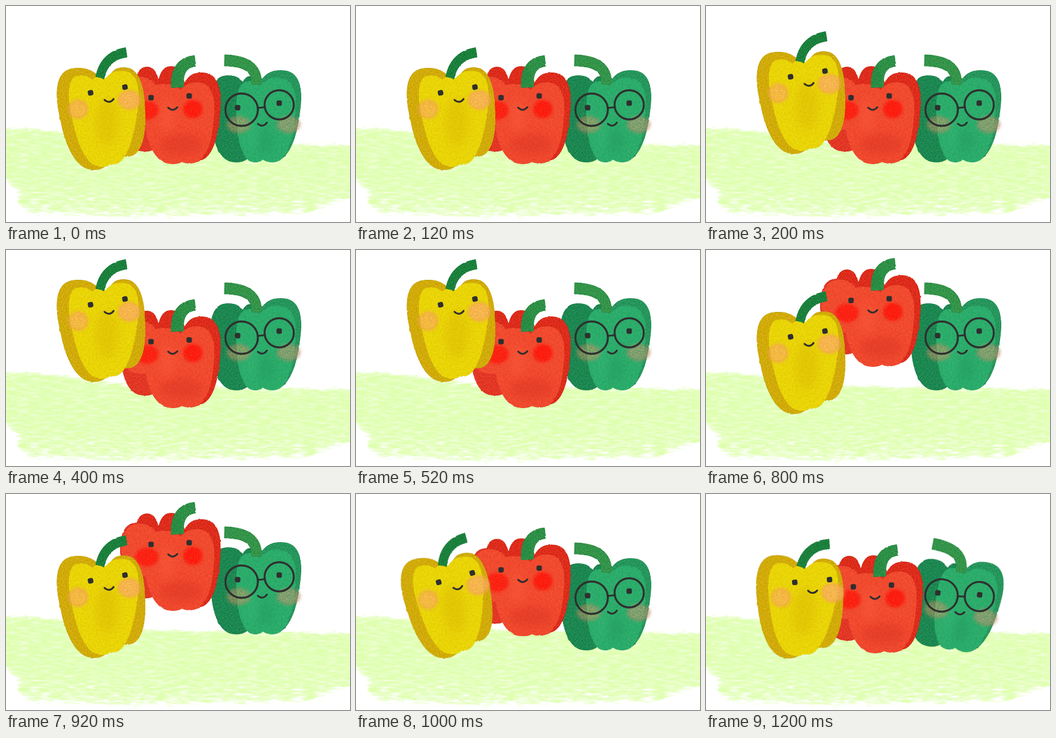
Recreate the animation shown at these times as an HTML page. Size 600 px wide and 377 px high, loop 1400 ms.

```html
<!DOCTYPE html>
<html lang="en">
<head>
<meta charset="utf-8">
<title>Three jumping peppers</title>
<style>
  html, body { margin: 0; width: 100%; height: 100%; overflow: hidden; background: #fff; }
  svg { display: block; width: 100%; height: 100%; }
</style>
</head>
<body>
<svg id="stage" viewBox="0 0 600 377" xmlns="http://www.w3.org/2000/svg"></svg>
<script>
const STEP = 200, STEPS = 7;
const INK = '#2f2f2f';

const outline = points => 'M' + points.map(p => p.map(v => v.toFixed(1))).join('L') + 'Z';
const painted = (d, fill, grain) => `<path d="${d}" fill="${fill}" filter="url(#${grain})"/>`;

// One rounded pepper lobe: a squarish ellipse, narrower and shifted by `lean` towards the bottom
function lobe(x, y, rx, ry, taper = 0, lean = 0) {
  const bulge = v => Math.sign(v) * Math.abs(v) ** 0.8;
  return outline(Array.from({ length: 72 }, (_, i) => {
    const a = i * Math.PI / 36, s = bulge(Math.sin(a));
    return [x + lean * s + rx * (1 - taper * s) * bulge(Math.cos(a)), y + ry * s];
  }));
}

const lobes = (fill, grain, ...list) => painted(list.map(l => lobe(...l)).join(''), fill, grain);

// A stem follows a quadratic curve from base to tip while its width changes evenly
function stem(fill, base, bend, tip, w0, w1) {
  const left = [], right = [];
  for (let t = 0; t <= 1.001; t += 0.05) {
    const [x, y] = [0, 1].map(k => (1 - t) ** 2 * base[k] + 2 * t * (1 - t) * bend[k] + t * t * tip[k]);
    const [vx, vy] = [0, 1].map(k => (1 - t) * (bend[k] - base[k]) + t * (tip[k] - bend[k]));
    const half = (w0 + (w1 - w0) * t) / 2 / Math.hypot(vx, vy);
    left.push([x - vy * half, y + vx * half]);
    right.unshift([x + vy * half, y - vx * half]);
  }
  return `<path d="${outline([...left, ...right])}" fill="${fill}" stroke="${fill}" stroke-width="3"
    stroke-linejoin="round" filter="url(#rough)"/>`;
}

const spot = (filter, x, y, rx, ry, fill, opacity) =>
  `<ellipse cx="${x}" cy="${y}" rx="${rx}" ry="${ry}" fill="${fill}" opacity="${opacity}" filter="url(#${filter})"/>`;
const shade = (...args) => spot('soft', ...args);
const cheek = (...args) => spot('spray', ...args);

const eye = (x, y, turn = 0) =>
  `<rect x="${x - 4.7}" y="${y - 4.7}" width="9.4" height="9.4" rx="3" fill="${INK}" transform="rotate(${turn} ${x} ${y})"/>`;

const line = d => `<path d="${d}" fill="none" stroke="${INK}" stroke-width="3.2" stroke-linecap="round"/>`;

const smile = (x, y, turn) =>
  `<g transform="translate(${x} ${y}) rotate(${turn})">${line('M-8 -2.5Q0 6 8 -2.500')}</g>`;

const ring = (x, y, r) =>
  `<circle cx="${x}" cy="${y}" r="${r}" fill="none" stroke="${INK}" stroke-width="3.4"/>`;

// Speckled paint with a slightly uneven edge
const grainFilter = (id, amount, freq) => `
  <filter id="${id}" x="-10%" y="-10%" width="120%" height="120%" color-interpolation-filters="sRGB">
    <feTurbulence type="fractalNoise" baseFrequency=".12" seed="4"/>
    <feColorMatrix values="1 0 0 0 0  0 1 0 0 0  0 0 1 0 0  0 0 0 0 1" result="wobble"/>
    <feDisplacementMap in="SourceGraphic" in2="wobble" scale="2.5" xChannelSelector="R" yChannelSelector="G" result="shape"/>
    <feTurbulence type="fractalNoise" baseFrequency="${freq}" numOctaves="3" seed="9"/>
    <feColorMatrix values="1 0 0 0 0  1 0 0 0 0  1 0 0 0 0  0 0 0 0 1" result="noise"/>
    <feComposite in="shape" in2="noise" operator="arithmetic" k2="1" k3="${amount}" k4="${-amount / 2}"/>
    <feComposite in2="shape" operator="in"/>
  </filter>`;

const defs = `<defs>
  ${grainFilter('fine', .1, .3)}
  ${grainFilter('rough', .2, .45)}
  <filter id="soft" x="-50%" y="-50%" width="200%" height="200%"><feGaussianBlur stdDeviation="8"/></filter>
  <filter id="spray" x="-30%" y="-30%" width="160%" height="160%" color-interpolation-filters="sRGB">
    <feGaussianBlur in="SourceGraphic" stdDeviation="2.5" result="puff"/>
    <feTurbulence type="fractalNoise" baseFrequency=".45" numOctaves="2" seed="3"/>
    <feColorMatrix values="0 0 0 0 1  0 0 0 0 1  0 0 0 0 1  2.4 0 0 0 -.5" result="dots"/>
    <feComposite in="puff" in2="dots" operator="arithmetic" k1=".8" k2=".4"/>
  </filter>
  <linearGradient id="fade" x2="0" y2="1">
    <stop offset=".55" stop-color="#000"/><stop offset="1" stop-color="#000" stop-opacity=".6"/>
  </linearGradient>
  <filter id="wash" filterUnits="userSpaceOnUse" x="0" y="190" width="600" height="187" color-interpolation-filters="sRGB">
    <feGaussianBlur in="SourceGraphic" stdDeviation="6 4" result="puff"/>
    <feTurbulence type="fractalNoise" baseFrequency=".05 .25" numOctaves="4" seed="12" result="noise"/>
    <feColorMatrix values="0 0 0 0 0  0 0 0 0 0  0 0 0 0 0  1 0 0 0 0" result="bristle"/>
    <feComposite in="puff" in2="bristle" operator="arithmetic" k2="2.3" k3="2.6" k4="-2.1" result="mask"/>
    <feFlood flood-color="#dfffb0"/>
    <feComposite in2="mask" operator="in" result="paint"/>
    <feColorMatrix in="noise" values="0 0 0 0 .97  0 0 0 0 1  0 0 0 0 .92  0 1.6 0 0 -.65" result="light"/>
    <feComposite in="light" in2="mask" operator="in" result="streaks"/>
    <feMerge><feMergeNode in="paint"/><feMergeNode in="streaks"/></feMerge>
  </filter>
</defs>`;

const ground = `<path filter="url(#wash)" fill="url(#fade)"
  d="M-20 213Q60 211 130 224T360 240L620 243V334L575 340L535 362L200 370L40 362L18 345L24 325L-20 285Z"/>`;

const yellow = {
  body:
    lobes('#d1ab09', 'rough', [140, 197, 46, 89, .1, 14], [207, 185, 36, 78, 0, 2]) +
    lobes('#e9d408', 'fine', [149, 201, 33, 80, 0, 18], [163, 200, 26, 77], [193, 195, 35, 82, .15, -8]) +
    shade(176, 203, 20, 42, '#d5ae00', .35) +
    stem('#1b803c', [164, 124], [172, 87], [209, 81], 13, 15),
  face:
    cheek(126, 180, 17.5, 17, '#f2a355', .8) + cheek(215, 164, 20, 17, '#f5a25e', .85) +
    eye(147.5, 151.5, -10) + eye(207.5, 141.5, -10) + smile(180, 165.5, -6),
  hop: { peak: 2, height: 56, power: 1 },
  sway: {
    5: { turn: [-6, 157, 250], shift: [0, 0], face: [7, 1] },
    6: { turn: [5, 157, 155], shift: [-1, 1.5], face: [8, 2] }
  }
};

const red = {
  body:
    lobes('#dd2c1b', 'rough', [246, 180, 25, 74], [288, 170, 26, 65], [337, 193, 36, 77, .1, -4]) +
    lobes('#e23725', 'rough', [236, 188, 36, 66, 0, 6]) +
    lobes('#f04a2f', 'fine', [234, 170, 33, 46], [283, 206, 42, 70, .1, 8], [326, 204, 36, 71, .05, -6]) +
    shade(306, 242, 38, 18, '#d93324', .45) +
    shade(281, 192, 14, 30, '#fa5a3b', .5) +
    stem('#2d9046', [299, 141], [296.5, 100], [329, 96], 20, 17) +
    shade(297, 123, 4, 12, '#126f38', .6),
  face:
    cheek(246, 182, 20, 16, '#ff1208', .8) + cheek(326, 180, 16.5, 15.5, '#ff1208', .9) +
    eye(253, 160) + eye(319.5, 157) + smile(291, 179.5, -3),
  hop: { peak: 4, height: 72, power: 1.38 },
  sway: { 6: { turn: [0, 0, 0], shift: [4, 2], face: [0, 0] } }
};

const green = {
  body:
    lobes('#1d8751', 'rough', [395, 197, 38, 76, 0, 7], [428, 180, 22, 58]) +
    lobes('#26965c', 'rough', [471, 192, 41, 80, .1, -8]) +
    lobes('#2cac6b', 'fine', [430, 202, 28, 71, 0, 5], [468, 199, 36, 74, .12, -4]) +
    shade(452, 236, 16, 22, '#209a5d', .5) +
    shade(430, 222, 10, 32, '#38b979', .4) +
    stem('#34944a', [437, 136], [439, 96], [382, 95], 15, 18),
  face:
    cheek(406, 207, 21, 15, '#c58c63', .55) + cheek(493, 207, 21, 15, '#bd8b6a', .6) +
    ring(411, 181, 28.3) + ring(476.5, 172.5, 25.5) + line('M439 178L452 176.5') +
    eye(404, 177.5) + eye(476.5, 169.5) + smile(447.5, 207, -8),
  hop: { peak: 3, height: 56, power: 1 },
  sway: { 6: { turn: [9, 440, 190], shift: [-1, 0], face: [-1, .5] } }
};

const peppers = [green, red, yellow];
const stage = document.getElementById('stage');
stage.innerHTML = defs + ground +
  peppers.map(p => `<g class="body">${p.body}</g><g class="face">${p.face}</g>`).join('');
const bodies = stage.querySelectorAll('.body');
const faces = stage.querySelectorAll('.face');
const upright = { turn: [0, 0, 0], shift: [0, 0], face: [0, 0] };

// Each hop takes two steps up and two steps down
const lift = ({ peak, height, power }, step) =>
  height * Math.max(0, 1 - Math.abs(step - peak) / 2) ** power;

function pose(step) {
  peppers.forEach((p, i) => {
    const { turn, shift: [dx, dy], face } = p.sway[step] || upright;
    const move = `translate(${dx} ${dy - lift(p.hop, step)}) rotate(${turn})`;
    bodies[i].setAttribute('transform', move);
    faces[i].setAttribute('transform', `translate(${face}) ${move}`);
  });
}

let start, shown = 0;
function tick(now) {
  start ??= now;
  const step = Math.floor(Math.max(0, now - start) / STEP) % STEPS;
  if (step !== shown) pose(shown = step);
  requestAnimationFrame(tick);
}
pose(0);
requestAnimationFrame(tick);
</script>
</body>
</html>
```
